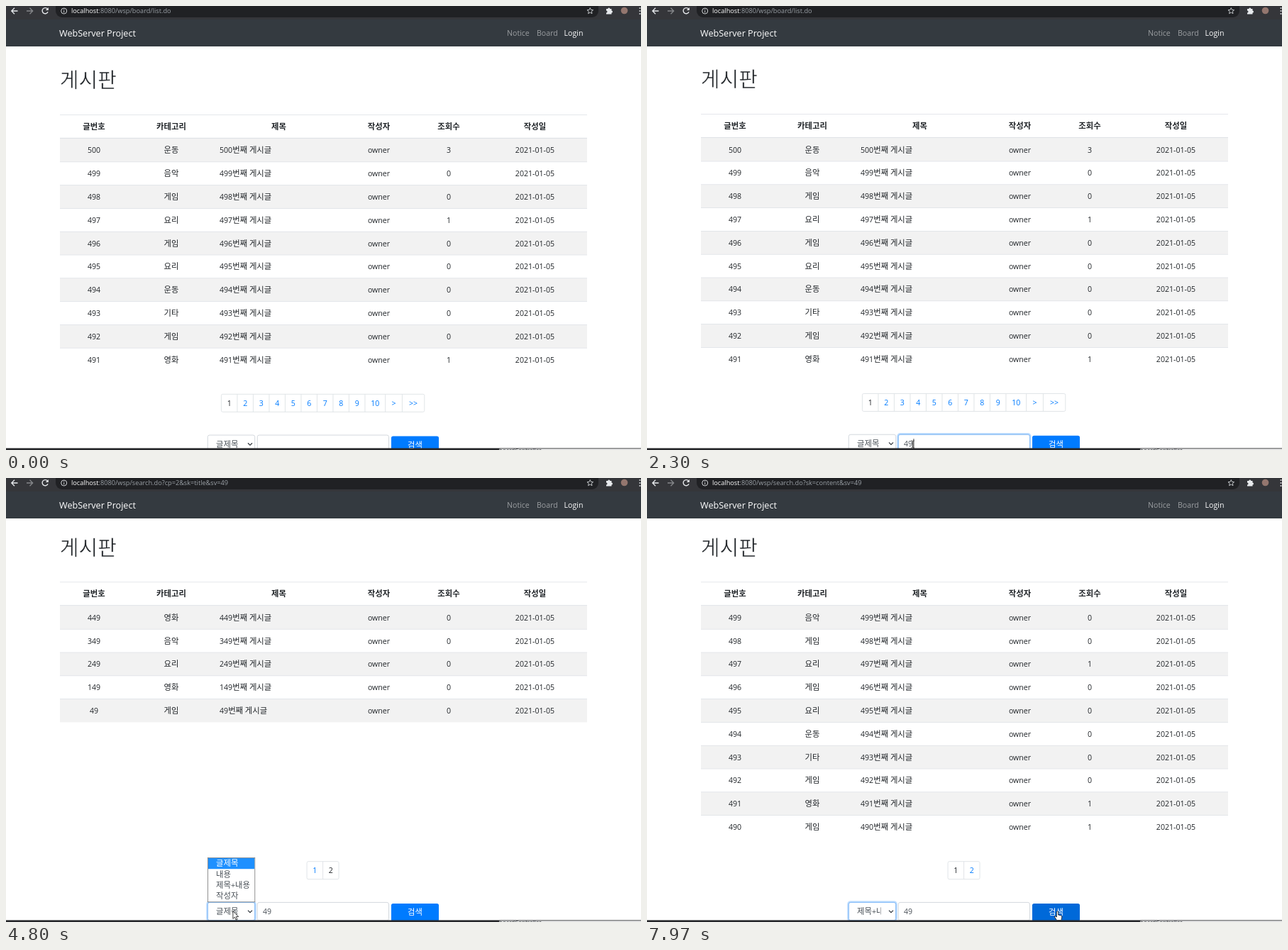
Recreate the animation shown at these times as an HTML page. Size 895 by 626 pixels, loop 8000 ms.

```html
<!DOCTYPE html>
<html lang="ko">
<head>
<meta charset="utf-8">
<title>WebServer Project</title>
<style>
html, body { margin: 0; width: 100%; height: 100%; overflow: hidden; background: #fff; }
svg { display: block; width: 895px; height: 626px; }
text { font: 10.6px "Open Sans", "Noto Sans", "Noto Sans CJK KR", sans-serif; fill: #212529; white-space: pre; }
.k { font-family: "Noto Sans CJK KR", "Noto Sans CJK", sans-serif; font-size: 1.075em; }
.mid { text-anchor: middle; }
.bold { font-weight: 700; }
.input { fill: #495057; }
.hint { fill: #fff; font-size: 8.4px; }
/* A thin white outline slims the large glyphs */
.title { font-size: 27px; font-weight: 300; stroke: #fff; stroke-width: .6px; }
</style>
</head>
<body>
<svg id="stage" viewBox="0 0 895 626"></svg>
<script>
const LOOP = 8000;
const HOST = 'localhost', ROOT = ':8080/wsp/';
const stage = document.getElementById('stage');

// Markup helpers
const hangul = s => s.replace(/[가-힣]+/g, m => `<tspan class="k">${m}</tspan>`);
const text = (x, y, s, cls = '', more = '') => `<text x="${x}" y="${y}" class="${cls}" ${more}>${hangul(s)}</text>`;
const paint = color => `style="fill:${color}"`;
const rect = (x, y, w, h, fill, more = '') =>
  `<rect x="${x}" y="${y}" width="${w}" height="${h}" fill="${fill}" ${more}/>`;
const line = (d, color, width = 1) => `<path d="${d}" fill="none" stroke="${color}" stroke-width="${width}"/>`;
const group = (id, body) => `<g id="${id}">${body}</g>`;
const box = (x, w, more) => rect(x, 605, w, 25.4, 'none', `rx="2.6" stroke-width=".9" ${more}`);

// Board content
const COLS = [124, 233, 384.5, 525.5, 624, 745.5];
const HEADS = '글번호 카테고리 제목 작성자 조회수 작성일'.split(' ');
const TOP = 187, ROW = 32.8, LAST_ROW = TOP + 9 * ROW;
const words = '운동 음악 게임 요리 게임 요리 운동 기타 게임 영화 게임'.split(' ');
const recent = words.map((word, i) => [500 - i, word]);
const older = '영화 음악 요리 영화 게임'.split(' ').map((word, i) => [449 - 100 * i, word]);
const viewCount = n => n === 500 ? 3 : [497, 491, 490].includes(n) ? 1 : 0;

function row([n, word], i) {
  const y = TOP + i * ROW, base = y + 20.4;
  const cells = [n, word, '', 'owner', viewCount(n), '2021-01-05'];
  return (i % 2 ? '' : rect(76, y, 743, ROW, '#f2f2f2')) +
    (i ? rect(76, y - .4, 743, .8, '#dee2e6') : '') +
    cells.map((c, j) => text(COLS[j], base, String(c), 'mid')).join('') +
    text(301, base, n + '번째 게시글');
}

// Links are as wide as their label plus padding, and centred as a whole
function pager(labels, active) {
  const widths = labels.map(s => 16.3 + s.length * (s[0] === '>' ? 7.5 : 6.2));
  const total = widths.reduce((a, b) => a + b);
  let x = 446.6 - total / 2;
  const links = widths.map((w, i) => {
    const seam = i ? line(`M${x} 547.3v25`, '#dee2e6', .9) : '';
    const label = text(x + w / 2, 564, labels[i].replace(/>/g, '&gt;'), 'mid', i === active ? '' : paint('#007bff'));
    x += w;
    return seam + label;
  });
  return rect(x - total, 547.3, total, 25, 'none', 'rx="2" stroke="#dee2e6" stroke-width=".9"') + links.join('');
}

const pages = [
  [recent.slice(0, 10), pager([...'123456789', '10', '>', '>>'], 0)],
  [recent.slice(1), pager(['1', '2'], 0)],
  [older, pager(['1', '2'], 1)]
].map(([rows, links], i) => group('page' + i, rows.map(row).join('') + links)).join('');

const focusRing = (id, x, w) => group(id,
  rect(x - 1, 604, w + 2, 27.4, 'none', 'rx="3.4" stroke="#007bff" stroke-opacity=".25" stroke-width="2.2"') +
  box(x, w, 'stroke="#80bdff"'));
const form = box(284.3, 66.4, 'stroke="#ced4da"') + box(354.3, 185.2, 'stroke="#ced4da"') +
  focusRing('selectRing', 284.3, 66.4) + focusRing('inputRing', 354.3, 185.2) +
  '<g clip-path="url(#selectClip)">' + text(296, 621.6, '', 'input', 'id="choice"') + '</g>' +
  line('M341 616.2l3 3 3-3', '#343a40', 1.3) +
  text(362, 621.8, '', 'input', 'id="query"') + rect(0, 611, .9, 14, '#222', 'id="caret"') +
  rect(542, 605.4, 69, 28, 'none', 'id="buttonRing" rx="4" stroke="#268fff" stroke-opacity=".5" stroke-width="2"') +
  rect(543, 606.5, 67, 25.4, '#007bff', 'id="button" rx="2.6"') + text(576.5, 622.6, '검색', 'mid', paint('#fff'));

const content = text(75.8, 115.3, '게시판', 'title') +
  rect(76, 153, 743, .8, '#dee2e6') + rect(76, 185.8, 743, 1.3, '#dee2e6') +
  HEADS.map((h, i) => text(COLS[i], 173.8, h, 'mid bold')).join('') +
  rect(76, LAST_ROW, 743, ROW, '#000', 'id="rowHover" fill-opacity=".075"') +
  rect(0, 547.8, 22, 24, '#e9ecef', 'id="linkHover"') + pages + form;

// Pop-ups
const OPTIONS = ['글제목', '내용', '제목+내용', '작성자'];
const OPTION_TOP = 535.9, OPTION_H = 15.3;
const popup = rect(284.4, 535.4, 66.4, 62.4, '#fff', 'stroke="#767676" stroke-width=".8"') +
  rect(285, 0, 65.2, OPTION_H, '#1e90ff', 'id="optionBar"') +
  OPTIONS.map((o, i) => text(296, OPTION_TOP + 11.5 + i * OPTION_H, o, 'option')).join('');
const hints = rect(353.3, 545, 187, 0, '#28292b', 'id="hintBox" rx="2"') +
  text(361.5, 0, '49', 'hint', 'id="hint0"') + text(361.5, 590.2, '50', 'hint', 'id="hint1"');

// Browser frame
const light = '#e8eaed', soft = '#d0d3d6';
const browser = rect(0, 0, 895, 19, '#35363a') + rect(70, -10, 765, 26, '#202124', 'rx="9"') +
  line('M16.5 7H8M12 2.8L7.8 7l4.2 4.2', light, 1.3) + line('M29 7h8.5M33.5 2.8L37.7 7l-4.2 4.2', '#85878a', 1.3) +
  group('reload', line('M58.5 4.2A4.1 4.1 0 1 0 59 8.3', light, 1.4) + `<path d="M59.8 2v4h-4z" fill="${light}"/>`) +
  group('stop', line('M51.5 3.5l7 7m0-7l-7 7', light, 1.4)) +
  `<circle cx="81.7" cy="7" r="4" fill="none" stroke="${soft}"/>` + line('M81.7 6.3v3M81.7 4.3v1.1', soft) +
  `<text x="92" y="10.2" style="font-size:9.2px;fill:#9aa0a6"><tspan fill="#fff">${HOST}</tspan><tspan id="url"></tspan></text>` +
  line('M823.3 2.6l1.3 2.8 3 .3-2.3 2 .7 3-2.7-1.6-2.7 1.6.7-3-2.3-2 3-.3z', soft, .9) +
  `<path d="M846 4h2.3a1.5 1.5 0 0 1 3 0h2.2v2.6a1.5 1.5 0 0 1 0 3v1.9H846V9.4a1.5 1.5 0 0 0 0-3z" fill="${light}"/>` +
  '<circle cx="871.5" cy="6.5" r="4.8" fill="#94766e"/>' +
  [3, 7, 11].map(y => `<circle cx="893.5" cy="${y}" r="1.1" fill="${soft}"/>`).join('') +
  rect(0, 19, 895, 38, '#343a40') +
  text(75, 43.3, 'WebServer Project', '', 'style="font-size:12.6px;fill:#fff"') +
  text(706, 42.3, 'Notice', '', paint('#9a9da0')) + text(748, 42.3, 'Board', '', paint('#9a9da0')) +
  text(786.5, 42.3, 'Login', '', paint('#fff'));
const status = rect(-3, 609.3, 199.8, 18, '#35363a', 'rx="2"') +
  text(.5, 619.3, '', '', 'id="statusText" style="font-size:7.95px;fill:#d5d7da"');
const footer = rect(0, 623.4, 895, 2.6, '#26272a') + rect(695, 624.2, 200, 1.8, '#e4e4e5') +
  text(695, 629, 'boardController', '', 'style="font-size:8px"');

const cursors = {
  arrow: '<path d="M0 0V10.8l2.5-2.3 1.8 4 1.8-.8-1.7-3.9h3.4z" fill="#fff" stroke="#111" stroke-width=".8"/>',
  beam: line('M-2.2-5h1.5l.7.6.7-.6h1.5M0-4.4v8.8M-2.2 5h1.5l.7-.6.7.6h1.5', '#222', .9),
  hand: '<path d="M-1.2 1a1.2 1.2 0 0 1 2.4 0V5l3.6.8q1.6.4 1.5 2l-.6 3.6q-.2 1.2-1.2 1.2H0q-1 0-1.6-1L-4 8q-.4-1.4 1-1.2l1.8 1.2z" fill="#fff" stroke="#111" stroke-width=".8"/>'
};

stage.innerHTML = '<defs><clipPath id="selectClip"><rect x="290" y="600" width="39.5" height="30"/></clipPath></defs>' +
  group('content', content) + group('hints', hints) + group('popup', popup) + browser + group('status', status) + footer +
  group('cursor', Object.entries(cursors).map(([k, s]) => group(k, s)).join(''));

// Story: loaded pages, typing, the two select menus and the places the cursor travels to
const scenes = [
  { from: 0, page: 0, url: 'board/list.do' },
  { from: 2860, page: 1, url: 'search.do?sk=title&sv=49' },
  { from: 3970, page: 2, url: 'search.do?cp=2&sk=title&sv=49' },
  { from: 6030, page: 1, url: 'search.do?sk=content&sv=49' }
];
const menus = [{ open: 4640, close: 5160, pick: 1 }, { open: 6800, close: 7500, pick: 2 }];
const FOCUS = 960, TYPE = 1510, KEY_GAP = 190, PRESS = 160, FADE = 150;

const option = i => [316, OPTION_TOP + (i + .5) * OPTION_H];
const BUTTON = [578.5, 611], FIELD = [374.5, 618], ENTRY = [819, 472];
const trips = [
  { from: 130, to: 470, spot: [375, 605] },
  { from: 830, to: 920, spot: FIELD },
  { from: 2300, to: 2600, spot: BUTTON },
  { from: 2880, to: 3150, spot: [431.5, 579] },
  { from: 3180, to: 3340, spot: [498, 572] },
  { from: 3340, to: 3600, spot: [457, 560] },
  { from: 3980, to: 4140, spot: [435, 562] },
  { from: 4140, to: 4270, spot: [394, 599] },
  { from: 4270, to: 4560, spot: [320, 612] },
  { from: 4780, to: 5000, spot: option(1) },
  { from: 5200, to: 5630, spot: BUTTON },
  { from: 6060, to: 6430, spot: [302, 614] },
  { from: 6850, to: 7100, spot: option(2) },
  { from: 7530, to: 7860, spot: BUTTON }
];

const clamp = v => Math.max(0, Math.min(1, v));
const smooth = u => u * u * (3 - 2 * u);
const latest = (list, t, key) => list.filter(e => e[key] <= t).pop();

function cursorAt(t) {
  return trips.reduce(([x, y], { from, to, spot }) => {
    const u = smooth(clamp((t - from) / (to - from)));
    return [x + (spot[0] - x) * u, y + (spot[1] - y) * u];
  }, ENTRY);
}

function scrollAt(t) {
  const { from } = latest(scenes, t, 'from');
  if (menus.some(m => m.open >= from && m.open <= t)) return 6.6;
  return from === 0 && t >= TYPE ? .8 : 0;
}

// What lies under the cursor follows from its place
function targetAt(t) {
  const [x, y] = cursorAt(t), pageY = y + scrollAt(t);
  const inside = (l, r, top, bottom) => x > l && x < r && pageY > top && pageY < bottom;
  if (inside(543, 610, 606, 632)) return 'button';
  if (inside(354, 540, 604.5, 631)) return 'input';
  if (inside(76, 819, LAST_ROW, LAST_ROW + ROW) && t < FOCUS) return 'row';
  if (latest(scenes, t, 'from').page === 0) return '';
  return inside(424, 446.5, 547, 572) ? 'link1' : inside(446.5, 469, 547, 572) ? 'link2' : '';
}

// Share of the last moments spent over the button
function buttonHover(t) {
  let hits = 0;
  for (let ago = 0; ago < FADE; ago += 15) hits += targetAt(Math.max(0, t - ago)) === 'button';
  return hits / 10;
}

const $ = id => document.getElementById(id);
const set = (id, attrs) => { for (const k in attrs) $(id).setAttribute(k, attrs[k]); };
const show = (id, on) => { $(id).style.display = on ? '' : 'none'; };
const options = document.querySelectorAll('.option');

function render(t) {
  const scene = latest(scenes, t, 'from');
  const pressing = scenes.some(s => s.from > t && s.from - PRESS <= t);
  const loading = scenes.some(s => s.from && t >= s.from - PRESS && t < s.from + 40);
  const shift = `translate(0 ${-scrollAt(t)})`;
  set('content', { transform: shift });
  set('hints', { transform: shift });
  scenes.forEach(s => show('page' + s.page, s.page === scene.page));
  $('url').textContent = ROOT + scene.url;
  show('reload', !loading);
  show('stop', loading);

  const typed = '49'.slice(0, Math.max(0, Math.ceil((t - TYPE) / KEY_GAP)));
  const focused = scene.from === 0 && t >= FOCUS && !pressing;
  $('query').textContent = typed;
  set('caret', { x: 363.3 + typed.length * 6.1 });
  show('caret', focused);
  show('inputRing', focused);
  set('inputRing', { opacity: clamp((t - FOCUS) / FADE) });

  const twoHints = !typed, hintTop = twoHints ? 545 : 569.5;
  show('hints', focused && t > FOCUS + 40 && typed.length < 2);
  show('hint1', focused);
  set('hintBox', { y: hintTop, height: 604.2 - hintTop });
  set('hint0', { y: hintTop + 20.8 });
  show('hint1', twoHints);

  const menu = latest(menus, t, 'open');
  const picked = latest(menus, t, 'close');
  const choice = picked ? picked.pick : 0;
  const selecting = menu && menu.open >= scene.from && !pressing;
  $('choice').innerHTML = hangul(OPTIONS[choice]);
  show('selectRing', selecting);
  if (menu) set('selectRing', { opacity: clamp((t - menu.open) / FADE) });

  const [x, y] = cursorAt(t);
  const over = Math.floor((y - OPTION_TOP) / OPTION_H);
  const marked = over < OPTIONS.length ? over : choice;
  show('popup', menu && t < menu.close);
  set('optionBar', { y: OPTION_TOP + marked * OPTION_H });
  options.forEach((o, i) => { o.style.fill = i === marked ? '#fff' : '#495057'; });

  const target = targetAt(t), hover = buttonHover(t);
  set('button', { fill: `rgb(0,${123 - 18 * hover},${255 - 38 * hover})` });
  show('buttonRing', pressing && target === 'button');
  show('rowHover', target === 'row' && t >= trips[0].from);

  const link = target.startsWith('link') && target;
  show('linkHover', link);
  set('linkHover', { x: link === 'link1' ? 424.4 : 446.9 });
  const recentTarget = targetAt(Math.max(0, t - 130));
  const shown = link || (recentTarget.startsWith('link') && recentTarget);
  show('status', shown);
  if (shown) $('statusText').textContent = `${HOST}${ROOT}search.do?cp=${shown.slice(-1)}&sk=title&sv=49`;

  const hidden = t < trips[0].from || (t >= TYPE && t < trips[2].from);
  const pointer = target === 'input' ? 'beam' : target === 'button' || link ? 'hand' : 'arrow';
  set('cursor', { transform: `translate(${x} ${y})` });
  Object.keys(cursors).forEach(k => show(k, !hidden && k === pointer));
}

const start = performance.now();
function tick() {
  render((performance.now() - start) % LOOP);
  requestAnimationFrame(tick);
}
tick();
</script>
</body>
</html>
```
